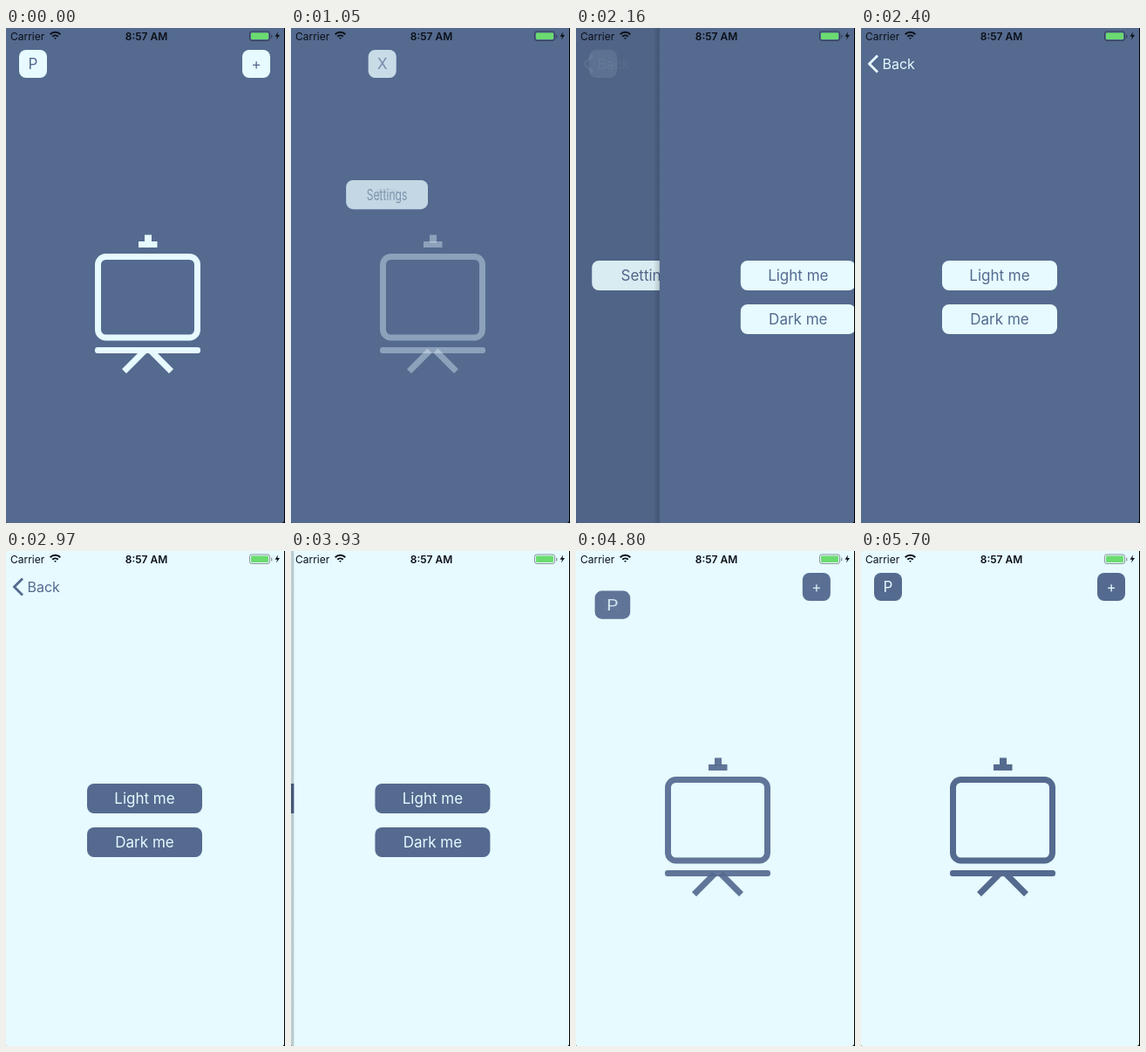
Animation, 320 px wide and 566 px high, one loop 5.76 s. Source, as an HTML page with a canvas:

```html
<!DOCTYPE html>
<html lang="en">
<head>
<meta charset="utf-8">
<title>Theme switch</title>
<style>
  html, body { margin: 0; width: 100%; height: 100%; overflow: hidden; background: #000; }
  canvas { display: block; width: 320px; height: 566px; }
</style>
</head>
<body>
<canvas></canvas>
<script>
const W = 320, H = 566, LOOP = 5760;
const NAVY = '#546a8f', ICE = '#e6faff';
const canvas = document.querySelector('canvas');
const c = canvas.getContext('2d');
const dpr = window.devicePixelRatio || 1;
canvas.width = W * dpr;
canvas.height = H * dpr;

// Button frames: centre and size
const LEFT = { x: 31, y: 41, w: 32, h: 32 };
const RIGHT = { x: 287, y: 41, w: 32, h: 32 };
const UPPER = { x: 159, y: 283, w: 132, h: 34 };
const LOWER = { x: 159, y: 333, w: 132, h: 34 };

let bg, fg;

const clamp = v => Math.max(0, Math.min(1, v));
const mix = (a, b, p) => a + (b - a) * p;
const mixFrame = (a, b, p) =>
  ({ x: mix(a.x, b.x, p), y: mix(a.y, b.y, p), w: mix(a.w, b.w, p), h: mix(a.h, b.h, p) });

// cubic-bezier(.4, 0, .2, 1)
function ease(x) {
  if (x <= 0 || x >= 1) return clamp(x);
  let lo = 0, hi = 1, s;
  for (let i = 0; i < 24; i++) {
    s = (lo + hi) / 2;
    const u = 1 - s;
    if (1.2 * u * u * s + 0.6 * u * s * s + s * s * s < x) lo = s; else hi = s;
  }
  return s * s * (3 - 2 * s);
}

// Critically damped spring from 0 to 1
function spring(ms) {
  if (ms <= 0) return 0;
  const k = 0.022 * ms, p = 1 - (1 + k) * Math.exp(-k);
  return p > 0.996 ? 1 : p;
}

function withAlpha(alpha, paint) {
  if (alpha <= 0) return;
  c.save();
  c.globalAlpha *= alpha;
  paint();
  c.restore();
}

function box(x, y, w, h, r, color) {
  c.fillStyle = color;
  c.beginPath();
  c.roundRect(x, y, w, h, r);
  c.fill();
}

function line(points, width, color) {
  c.strokeStyle = color;
  c.lineWidth = width;
  c.beginPath();
  points.forEach(([x, y]) => c.lineTo(x, y));
  c.stroke();
}

function text(str, x, y, size, color, align = 'left', weight = 400) {
  c.font = `${weight} ${size}px Inter, sans-serif`;
  c.textAlign = align;
  c.fillStyle = color;
  c.fillText(str, x, y);
}

// The label stretches with the frame, relative to its resting size
function button(label, f, rest = f, alpha = 1) {
  withAlpha(alpha, () => {
    box(f.x - f.w / 2, f.y - f.h / 2, f.w, f.h, 8, fg);
    c.translate(f.x, f.y);
    c.scale(f.w / rest.w, f.h / rest.h);
    text(label, 0, 6.2, 17, bg, 'center');
  });
}

function morph(fromLabel, from, toLabel, to, p) {
  const f = mixFrame(from, to, p);
  button(fromLabel, f, from, 1 - p);
  button(toLabel, f, to, p);
}

function board() {
  box(159, 236.5, 8, 9, 0, fg);
  box(152, 244, 21.5, 7, 0, fg);
  c.strokeStyle = fg;
  c.lineWidth = 7;
  c.beginPath();
  c.roundRect(105.5, 261.5, 114, 92.5, 9);
  c.stroke();
  line([[135.5, 392.5], [159, 369]], 7, fg);
  line([[189.5, 392.5], [166, 369]], 7, fg);
  box(102, 365, 121, 7, 3, fg);
}

function mainAndMenu(p, pFast) {
  withAlpha(1 - p, board);
  morph('P', LEFT, 'Settings', UPPER, p);
  morph('+', RIGHT, 'X', LEFT, pFast);
}

function pages(p) {
  const edge = W * (1 - p);
  c.save();
  c.translate(-W / 3 * p, 0);
  button('Settings', UPPER);
  c.restore();
  c.fillStyle = `rgba(0,0,0,${0.08 * p})`;
  c.fillRect(0, 0, W, H);

  if (p < 1) {
    const shade = c.createLinearGradient(edge - 7, 0, edge, 0);
    shade.addColorStop(0, 'rgba(0,0,0,0)');
    shade.addColorStop(1, 'rgba(0,0,0,.16)');
    c.fillStyle = shade;
    c.fillRect(edge - 7, 0, 7, H);
  }
  c.save();
  c.translate(edge, 0);
  c.fillStyle = bg;
  c.fillRect(0, 0, W, H);
  button('Light me', UPPER);
  button('Dark me', LOWER);
  c.restore();
}

function backButton() {
  line([[19, 31.5], [9.5, 41], [19, 50.5]], 2.8, fg);
  text('Back', 24.5, 47, 16, fg);
}

function statusBar() {
  const ink = '#0c1018';
  text('Carrier', 5, 13.6, 12, ink);
  text('8:57 AM', 161, 13.6, 12, ink, 'center', 600);

  c.strokeStyle = ink;
  c.lineWidth = 2;
  for (const r of [1, 4.6, 8.2]) {
    c.beginPath();
    c.arc(56.5, 13, r, -Math.PI * 0.75, -Math.PI * 0.25);
    c.stroke();
  }

  c.strokeStyle = 'rgba(0,0,0,.4)';
  c.lineWidth = 1;
  c.beginPath();
  c.roundRect(279.5, 4, 23, 10.5, 2.5);
  c.stroke();
  box(304, 7.5, 1.3, 4, 0.6, 'rgba(0,0,0,.4)');
  box(281, 5.5, 20, 7.5, 1.2, '#6bdb70');

  c.fillStyle = ink;
  c.beginPath();
  [[312, 4.5], [308.5, 9.8], [311, 9.8], [310, 13.5], [314, 8], [311.4, 8]]
    .forEach(([x, y]) => c.lineTo(x, y));
  c.fill();
}

function draw(t) {
  [bg, fg] = t < 2970 ? [NAVY, ICE] : [ICE, NAVY];
  c.setTransform(dpr, 0, 0, dpr, 0, 0);
  c.fillStyle = '#000';
  c.fillRect(0, 0, W, H);

  c.save();
  c.beginPath();
  c.roundRect(0, 0, 319, H, [0, 0, 3, 1.5]);
  c.clip();
  c.fillStyle = bg;
  c.fillRect(0, 0, W, H);

  const push = t < 3924 ? spring(t - 2050) : 1 - spring(t - 3924);
  if (push > 0) {
    pages(push);
    button('X', LEFT, LEFT, clamp(1 - 1.3 * push));
    const pressed = clamp((t - 3705) / 200);
    withAlpha(clamp((push - 0.68) / 0.32) * (1 - pressed), backButton);
  } else {
    const menu = (duration, closing) =>
      t < 4000 ? ease((t - 940) / duration) : 1 - ease((t - 4545) / closing);
    mainAndMenu(menu(276, 390), menu(244, 345));
  }
  statusBar();
  c.restore();
}

function tick() {
  draw(performance.now() % LOOP);
  requestAnimationFrame(tick);
}
tick();
</script>
</body>
</html>
```
